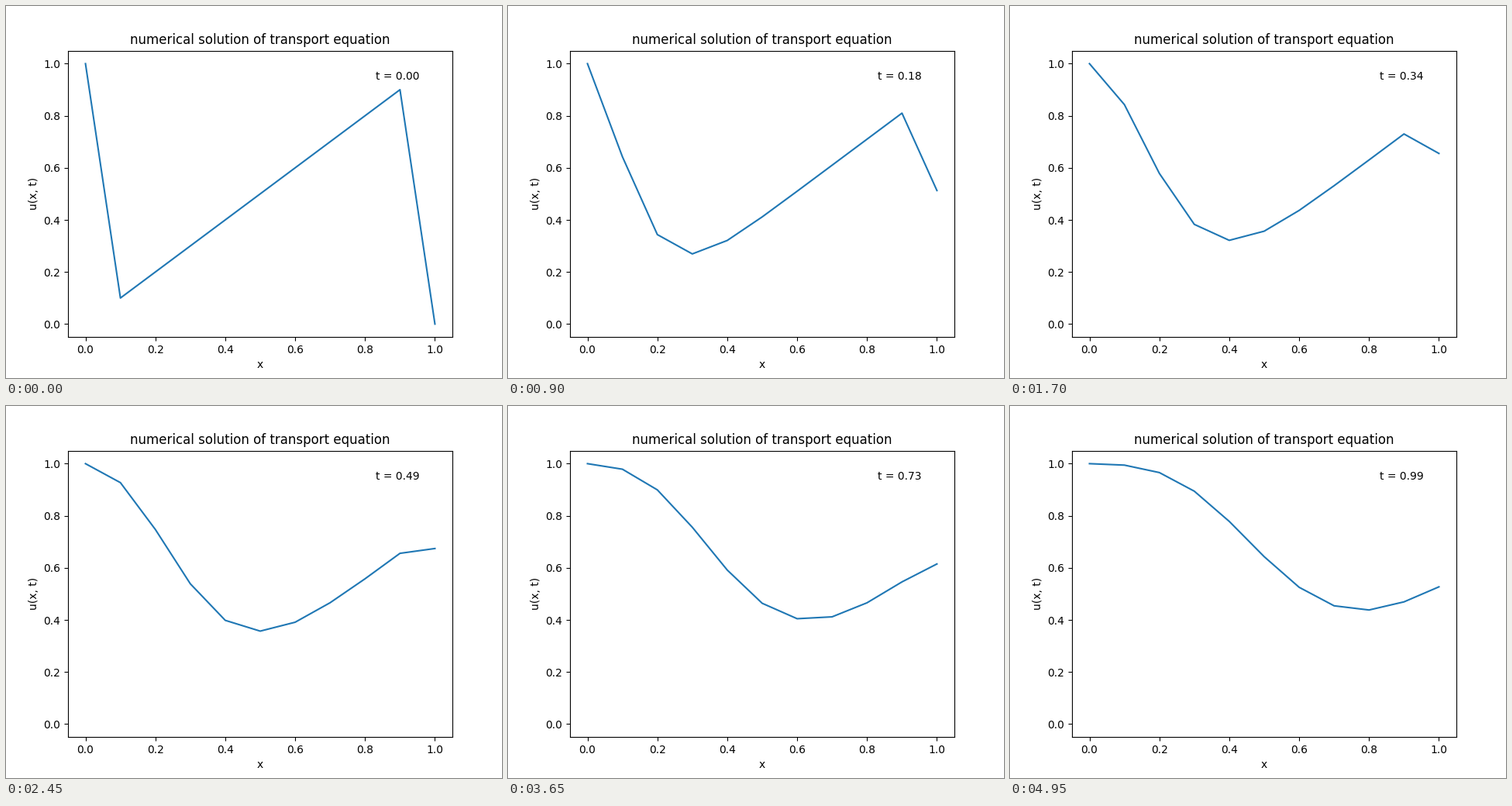
Write a matplotlib script that moves like this. It is 640 px wide and 480 px high and loops after 5000 ms.

```python
import numpy as np
import matplotlib.pyplot as plt
from matplotlib.animation import FuncAnimation

FRAMES = 100
DX, DT, SPEED = 0.1, 0.01, 0.5


def solve(u, steps):
    """Explicit upwind scheme with a fixed inflow value at x = 0."""
    courant = SPEED * DT / DX
    history = [u]
    for _ in range(steps - 1):
        u = u.copy()
        u[1:] -= courant * np.diff(u)
        history.append(u)
    return history


x = np.linspace(0, 1, 11)
start = x.copy()
start[0], start[-1] = 1, 0
solution = solve(start, FRAMES)

fig, ax = plt.subplots(figsize=(6.4, 4.8), dpi=100)
line, = ax.plot(x, start)
clock = ax.text(0.8, 0.9, "t = 0.00", transform=ax.transAxes)
ax.set_title("numerical solution of transport equation")
ax.set_xlabel("x")
ax.set_ylabel("u(x, t)")
ax.set_xlim(-0.05, 1.05)
ax.set_ylim(-0.05, 1.05)


def update(i):
    line.set_ydata(solution[i])
    clock.set_text(f"t = {i * DT:.2f}")
    return line, clock


anim = FuncAnimation(fig, update, frames=FRAMES, interval=50,
                     repeat=True, repeat_delay=0)
plt.show()
```
